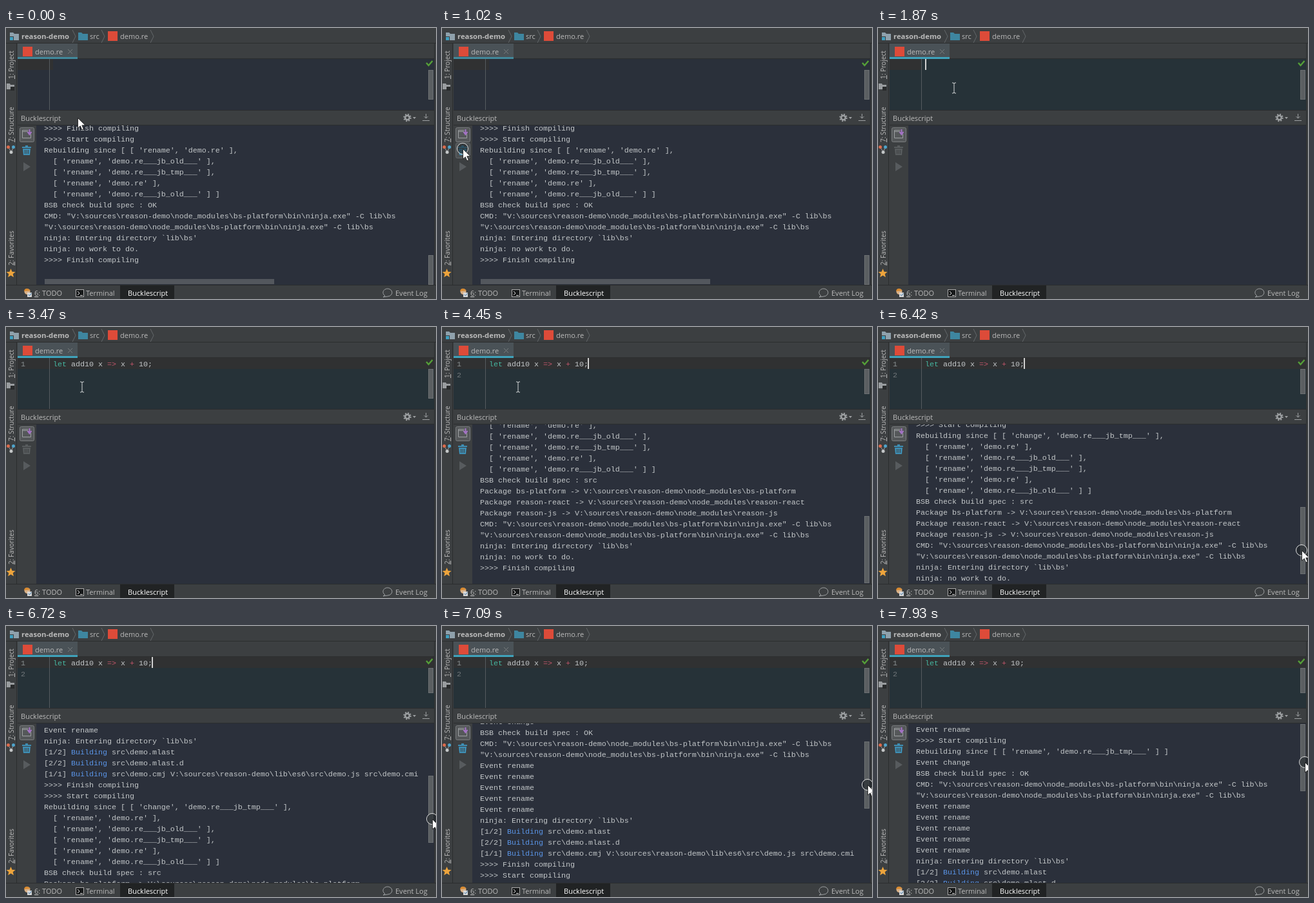
Write an HTML page that moves like this. It is 667 px wide and 420 px high and loops after 8 s.

```html
<!DOCTYPE html>
<html lang="en">
<head>
<meta charset="utf-8">
<title>Build console</title>
<style>
  html, body { margin: 0; width: 100%; height: 100%; overflow: hidden; background: #3c3f41; }
  svg { display: block; width: 667px; height: 420px; }
  text { font: 11px "Open Sans", "Noto Sans", sans-serif; fill: #bbb; white-space: pre; }
  .mono text, text.mono { font: 11.667px "Liberation Mono", monospace; fill: #c3c7c9; }
  .side text { font-size: 10.1px; }
  .line { fill: none; stroke: #9da0a2; }
  .edge { fill: #2b2d2e; }
  .thumb { fill: #5b5f62; stroke: #6b6f72; }
  .u { text-decoration: underline; }
</style>
</head>
<body>
<svg viewBox="0 0 667 420">
  <rect width="667" height="420" fill="#3c3f41"/>

  <!-- breadcrumbs -->
  <path d="M6 7h5l2 2h7v10H6z" fill="#8fa1ac"/>
  <rect x="5" y="13" width="7" height="7" fill="#3c3f41"/>
  <rect x="6" y="14" width="5" height="5" fill="#40a0c0"/>
  <text x="24" y="17" style="font-weight:bold;font-size:11.3px">reason-demo</text>
  <path d="M112 7h5l2 2h8v10h-15z" fill="#3e86a0"/>
  <text x="130" y="17">src</text>
  <rect x="158" y="5" width="15" height="15" fill="#dd4b39"/>
  <text x="177" y="17">demo.re</text>
  <path d="M103 3l5 10-5 10M148 3l5 10-5 10M224 3l5 10-5 10" class="line" style="stroke:#63676a"/>
  <rect y="23" width="667" height="1" class="edge"/>

  <!-- editor -->
  <rect x="18" y="24" width="93" height="21" fill="#4a5257"/>
  <rect id="underline" x="18" y="45" width="93" height="3"/>
  <rect x="26" y="29" width="15" height="15" fill="#dd4b39"/>
  <text x="45" y="41">demo.re</text>
  <path d="M96 33l7 7m0-7l-7 7" class="line" style="stroke:#777b7d"/>
  <rect x="111" y="47" width="553" height="1" class="edge"/>
  <rect id="editor" x="18" y="48" width="646" height="79"/>
  <rect id="row" x="18" y="48" height="17" fill="#303132"/>
  <path d="M67.5 48v79" stroke="#555b5f"/>
  <g id="code" class="mono">
    <text x="23" y="61" style="fill:#8a9092">1</text>
    <text x="73" y="61"><tspan fill="#45b5a0">let</tspan> add10 x <tspan fill="#c2566b">=&gt;</tspan> x <tspan fill="#c2566b">+</tspan> 10;</text>
  </g>
  <text id="second" class="mono" x="23" y="78" style="fill:#71777a">2</text>
  <rect id="caret" y="48" width="2" height="17" fill="#d0d0d0"/>
  <path id="check" d="M652 54l3.5 4 6-7" fill="none" stroke="#55a038" stroke-width="2.4"/>
  <g id="eye"><path d="M651 54.5q6-7 12 0q-6 7-12 0z" fill="#a7aaab"/><circle cx="657" cy="54.5" r="2" fill="#3c3f41"/></g>
  <rect id="editorThumb" class="thumb" x="655.5" y="65.5" width="7"/>

  <!-- tool window header -->
  <rect x="18" y="127" width="646" height="1" class="edge"/>
  <text x="23" y="144">Bucklescript</text>
  <circle cx="622.5" cy="139" r="3.3" fill="none" stroke="#9da0a2" stroke-width="2.4"/>
  <circle cx="622.5" cy="139" r="5.2" fill="none" stroke="#9da0a2" stroke-width="2" stroke-dasharray="2 2.08"/>
  <path d="M631 138h5l-2.5 3z" fill="#9da0a2"/>
  <path d="M651.5 133v7m-3-3l3 3 3-3M646 143.5h11" class="line"/>
  <rect x="18" y="150" width="646" height="1" class="edge"/>

  <!-- console -->
  <rect x="47" y="151" width="617" height="247" fill="#2b303b"/>
  <rect x="21.5" y="154.5" width="22" height="22" rx="2" fill="#55585a" stroke="#7b7e80"/>
  <path d="M25.5 158.5h9m4 6v6h-13v-12M25 160.5h9" class="line"/>
  <path d="M36.5 157v6m-3-2l3 4 3-4" fill="none" stroke="#a774c9" stroke-width="2"/>
  <rect id="hover" x="21.5" y="178.5" width="22" height="23" rx="2" fill="#4c5052" stroke="#65696b"/>
  <path id="trash" d="M25 184h5v-2h4v2h5v2H25zM26 187h12l-1 10H27zM29 189v6h1v-6zM31.5 189v6h1v-6zM34 189v6h1v-6z" fill-rule="evenodd"/>
  <path d="M27 208v14l11-7z" fill="#575b5e"/>
  <clipPath id="view"><rect x="48" y="151" width="616" height="247"/></clipPath>
  <g clip-path="url(#view)" class="mono">
    <g id="oldLog"></g>
    <g id="newLog"></g>
  </g>
  <rect id="sideThumb" class="thumb" x="655.5" width="7"/>
  <rect id="wideThumb" x="60" y="389" width="356" height="8" fill="#53575d"/>

  <!-- frame bars -->
  <rect x="16" y="24" width="1" height="374" class="edge"/>
  <rect x="664" y="24" width="1" height="374" class="edge"/>
  <rect y="398" width="667" height="1" class="edge"/>
  <g class="side">
    <text transform="translate(12 79) rotate(-90)"><tspan class="u">1</tspan>: Project</text>
    <text transform="translate(12 177) rotate(-90)"><tspan class="u">7</tspan>: Structure</text>
    <text transform="translate(12 368) rotate(-90)"><tspan class="u">2</tspan>: Favorites</text>
  </g>
  <path d="M1 86h5l1 2h6v7H1z" fill="#9a9da0"/><rect x="7" y="91" width="6" height="6" fill="#292b2c"/>
  <path d="M3 184l5 8 4-8" class="line"/>
  <circle cx="3.5" cy="184.5" r="2.5" fill="#dc6b4c"/><circle cx="11.5" cy="184.5" r="2.5" fill="#4ea4cb"/><circle cx="8" cy="192.5" r="2.5" fill="#c4c7c8"/>
  <path d="M7.5 373l2 4.700 5 .4-3.800 3.200 1.200 5-4.400-2.700-4.400 2.700 1.200-5-3.800-3.200 5-.4z" fill="#eda43c"/>
  <circle cx="33" cy="408.5" r="4.5" fill="#d9b187"/><path d="M28 408q1-5 6-4l4 3z" fill="#d88a30"/>
  <rect x="33" y="410" width="7" height="7" fill="#d8d8d8"/><path d="M34.5 413l2 2 3-4" fill="none" stroke="#3a75a8"/>
  <text x="44" y="415"><tspan class="u">6</tspan>: TODO</text>
  <rect x="108.5" y="405.5" width="12" height="11" fill="#17191a" stroke="#aaa"/><path d="M111 408l3 3-3 3m4 .5h4" class="line" style="stroke:#ddd"/>
  <text x="124" y="415">Terminal</text>
  <rect x="177" y="399" width="84" height="21" fill="#212324"/>
  <text x="189" y="415" style="fill:#fff">Bucklescript</text>
  <path d="M588 415a7 6 0 1 1 4 1l-7 1z" class="line"/>
  <text x="604" y="415">Event Log</text>

  <!-- pointer -->
  <g id="pointer">
    <circle id="ring" r="8.5" fill="#20242a" fill-opacity=".6" stroke="#e2e2e2"/>
    <path id="arrow" d="M.5.5v15.500l3.800-3.200 2.500 6 2.500-1-2.500-6H12z" fill="#fff" stroke="#111" stroke-width=".8"/>
    <path id="beam" d="M-3-8h2l1 1 1-1h2M0-7V7M-3 8h2l1-1 1 1h2" fill="none" stroke="#d5d8d9"/>
  </g>
</svg>

<script>
const $ = id => document.getElementById(id);
const LOOP = 8000, PITCH = 17, TOP = 152, TRACK = 246, VIEW = 248;

const exe = String.raw`"V:\sources\reason-demo\node_modules\bs-platform\bin\ninja.exe" -C lib\bs`;
const entering = "ninja: Entering directory `lib\\bs'";
const started = ">>>> Start compiling", finished = ">>>> Finish compiling";
const renames = ["", "___jb_old___", "___jb_tmp___", "", "___jb_old___"]
  .map((suffix, i) => `  [ 'rename', 'demo.re${suffix}' ]${i === 4 ? " ]" : ","}`);
const tail = ["CMD: " + exe, exe, entering, "ninja: no work to do.", finished];
const pkg = name => `Package ${name} -> V:\\sources\\reason-demo\\node_modules\\${name}`;

const oldLines = [
  finished, started, "Rebuilding since [ [ 'rename', 'demo.re' ],",
  ...renames.slice(1), "BSB check build spec : OK", ...tail
];
const newLines = [
  "Event rename", started, "Rebuilding since [ [ 'rename', 'demo.re___jb_tmp___' ] ]",
  "Event change", "BSB check build spec : OK", "CMD: " + exe, exe,
  ...Array(5).fill("Event rename"), entering,
  "[1/2] Building src\\demo.mlast", "[2/2] Building src\\demo.mlast.d",
  "[1/1] Building src\\demo.cmj V:\\sources\\reason-demo\\lib\\es6\\src\\demo.js src\\demo.cmi",
  finished, started, "Rebuilding since [ [ 'change', 'demo.re___jb_tmp___' ],",
  ...renames, "BSB check build spec : src",
  ...["bs-platform", "reason-react", "reason-js"].map(pkg), ...tail
];

function fillLog(group, lines, baseline) {
  group.innerHTML = lines.map((line, i) => {
    const safe = line.replace(/>/g, "&gt;").replace(/(\] )(Building)/, '$1<tspan fill="#5a94e6">$2</tspan>');
    return `<text x="59" y="${baseline + i * PITCH}">${safe}</text>`;
  }).join("");
}
fillLog($("oldLog"), oldLines, 159);
fillLog($("newLog"), newLines, 164);

// time, x, y
const path = [
  [0, 111, 139], [460, 32, 187], [1200, 32, 187], [1800, 118, 93], [4880, 118, 93],
  [5710, 649, 360], [5990, 657, 360], [6180, 657, 360], [6420, 657, 346.4], [6720, 661, 298.5],
  [7090, 660, 246], [7500, 661, 210], [7810, 661, 210], [7930, 662, 211], [LOOP, 662, 211]
];
const caretOn = [[1870, 2480], [2850, 3470], [3970, 4940], [5440, 5940], [6420, 6920], [7420, 7930]];
const pressed = [[1020, 1080], [1800, 1870], [6240, LOOP]];
const output = [[4450, newLines.length], [4390, 24], [4330, 13], [4270, 4], [0, 0]];

const within = (t, spans) => spans.some(([a, b]) => t >= a && t < b);
const show = (id, on) => $(id).setAttribute("visibility", on ? "visible" : "hidden");
const set = (id, attrs) => { for (const k in attrs) $(id).setAttribute(k, attrs[k]); };

function pointerAt(t) {
  const i = path.findIndex(p => p[0] > t);
  const [a, x0, y0] = path[i - 1], [b, x1, y1] = path[i];
  const p = Math.floor((t - a) / 60) * 60 / (b - a);   // pointer is sampled every 60 ms
  return [x0 + (x1 - x0) * p, y0 + (y1 - y0) * p];
}

function draw(t) {
  const [x, y] = pointerAt(t);
  const typed = t >= 2850, saved = t >= 4270, cleared = t >= 1080;

  const overText = (x > 67 && x < 655 && y > 48 && y < 127) || (x > 47 && x < 655 && y > 151 && y < 398);
  set("pointer", { transform: `translate(${Math.round(x)} ${Math.round(y)})` });
  show("ring", within(t, pressed));
  show("arrow", !overText);
  show("beam", overText);

  set("underline", { fill: cleared ? "#3fa2bb" : "#42899c" });
  set("editor", { fill: cleared ? "#263238" : "#2a303a" });
  set("row", { width: typed ? 646 : cleared ? 49 : 55 });
  set("caret", { x: typed ? 226 : 73 });
  show("caret", within(t, caretOn));
  show("code", typed);
  show("second", saved);
  const checking = t >= 2850 && t < 3160;
  show("check", !checking);
  show("eye", checking);
  set("editorThumb", { height: saved ? 38 : 45 });

  show("hover", x > 20 && x < 45 && y > 177 && y < 202);
  set("trash", { fill: cleared && !saved ? "#585c5e" : "#3e8fb5" });
  show("oldLog", !cleared);
  show("wideThumb", !cleared);

  const count = output.find(([from]) => t >= from)[1];
  [...$("newLog").children].forEach((line, i) => line.setAttribute("visibility", i < count ? "visible" : "hidden"));
  const content = (count + 1) * PITCH + 1;
  const maxScroll = Math.max(0, content - VIEW);
  const size = cleared ? TRACK * TRACK / content : 46;
  const room = TRACK - size;
  let offset = room;
  if (t >= 6240) offset = Math.min(room, Math.max(0, y - 67 - TOP));
  set("newLog", { transform: `translate(0 ${-Math.round(maxScroll * offset / room)})` });
  set("sideThumb", { y: Math.round(TOP + offset) + 0.5, height: Math.floor(size) - 1 });
  show("sideThumb", !cleared || maxScroll > 0);
}

function tick() {
  draw(performance.now() % LOOP);
  requestAnimationFrame(tick);
}
tick();
</script>
</body>
</html>
```
